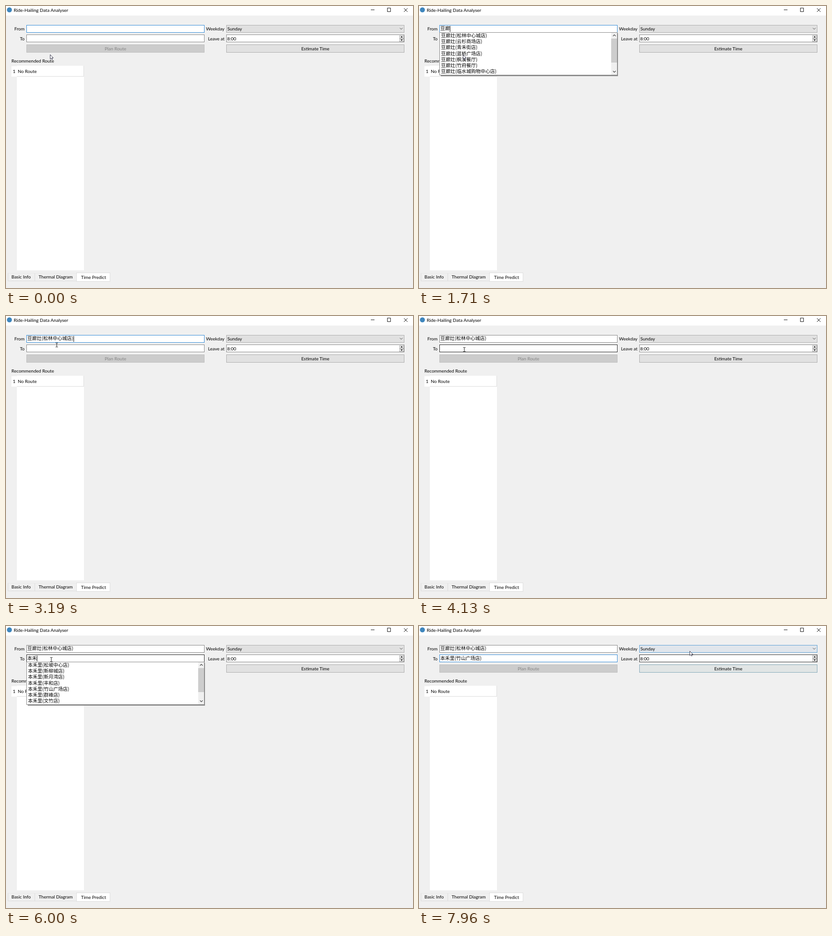
Recreate the animation shown at these times as an HTML page. Size 898 by 623 pixels, loop 8000 ms.

```html
<!DOCTYPE html>
<html lang="zh-CN">
<head>
<meta charset="utf-8">
<title>Ride-Hailing Data Analyser</title>
<style>
html, body { margin: 0; width: 100%; height: 100%; overflow: hidden; background: #f0f0f0; }
#stage { position: relative; width: 898px; height: 623px; overflow: hidden; background: #f0f0f0;
  font: 10px/16px Lato, "Noto Sans CJK SC", sans-serif; color: #000; cursor: default; }
#stage div, #stage svg { position: absolute; box-sizing: border-box; white-space: pre; }
#stage svg { overflow: visible; fill: none; }
.field { background: #fff; border: 1px solid #858585; }
.button { background: #e1e1e1; border: 1px solid #adadad; text-align: center; }
.zh { font-family: "Noto Sans CJK SC", "Noto Sans CJK", sans-serif; font-size: 10.5px; }
.preedit { border-bottom: 1px dotted #333; line-height: 13px; height: 12px; }
.caret { width: 1px; height: 13px; background: #000; }
.ime { height: 28px; background: #fff; border: 1px solid #0078d7; display: flex;
  font: 11px/27px "Noto Sans CJK SC", "Noto Sans CJK", sans-serif; }
#stage .ime div { position: relative; height: 26px; flex: none; padding-left: 10px; }
.ime small { display: inline-block; width: 7px; font-size: 7.5px; color: #777; }
#stage .ime .first { background: #0078d7; color: #fff; }
.ime .first small { color: #fff; }
#stage .ime .face { width: 28px; border-left: 1px solid #0078d7; }
.drop { background: #fff; border: 1px solid #858585; overflow: hidden; line-height: 13px; }
.drop .row { padding-left: 2.5px; }
.drop .on { background: #0078d7; color: #fff; }
</style>
</head>
<body>
<div id="stage"></div>
<script>
const LOOP = 8000;
const FOCUS = '#3089d6', IDLE = '#858585', HOVER = '#222';
const stage = document.getElementById('stage');

function box(x, y, w, h, style = '', cls = '', parent = stage) {
  const el = document.createElement('div');
  el.className = cls;
  el.style.cssText = `left:${x}px;top:${y}px;width:${w}px;height:${h}px;${style}`;
  parent.append(el);
  return el;
}
function label(x, y, text, style = '') {
  const el = document.createElement('div');
  el.style.cssText = `left:${x}px;top:${y - 8}px;${style}`;
  el.textContent = text;
  stage.append(el);
  return el;
}
function icon(x, y, shapes, parent = stage) {
  const holder = box(x, y, 0, 0, 'padding:0', '', parent);
  holder.innerHTML = `<svg width="1" height="1" style="left:0;top:0">${shapes}</svg>`;
  return holder;
}
const line = (d, color = '#333', width = 1) =>
  `<path d="${d}" stroke="${color}" stroke-width="${width}"/>`;
const show = (el, on) => { el.style.visibility = on ? 'visible' : 'hidden'; };

// Title bar
box(0, 0, 898, 21, 'background:#fff');
box(2, 3, 11, 11, 'background:#3f86bd;border-radius:50%');
label(17, 9, 'Ride-Hailing Data Analyser', 'font-size:10.25px');
icon(805, 9, line('M0 -.5h8M36.5 -4.5h7v8h-7zM73 -4l8 8M81 -4l-8 8', '#111'));

// Form
const rightLabel = (x, y, text) => label(0, y, text, `left:auto;right:${898 - x}px`);
rightLabel(41, 50, 'From');
rightLabel(41, 72, 'To');
rightLabel(482, 50, 'Weekday');
rightLabel(482, 72, 'Leave at');
const from = box(45, 42, 393, 17, '', 'field');
const to = box(45, 63, 393, 17, '', 'field');
const week = box(486, 42, 393, 17, '', 'button');
const spin = box(486, 63, 393, 17, '', 'field');
box(45, 85, 393, 18, 'background:#ccc;border-color:#bfbfbf;color:#838383', 'button').textContent = 'Plan Route';
const estimate = box(486, 85, 393, 18, '', 'button');
estimate.textContent = 'Estimate Time';
label(488.5, 50, 'Sunday');
label(488, 72, '8:00');
icon(872, 50, line('M-3 -1.5l3 3l3 -3', '#444'));
box(868, 65, 10, 7, 'background:#f0f0f0;border:1px solid #aaa');
box(868, 72, 10, 7, 'background:#f0f0f0;border:1px solid #aaa');
icon(873, 72, '<path d="M-2.5 -2.5h5l-2.5 -3zM-2.5 2h5l-2.5 3z" fill="#111"/>');

// Route list
label(12, 121, 'Recommended Route');
box(24, 132, 148, 452, 'background:#fff');
box(12, 133, 12, 23, 'background:#fff');
box(24, 132, 148, 24, 'border:solid #dcdcdc;border-width:0 1px 1px 0');
label(15, 144, '1');
label(26, 144, 'No Route');

// Tabs
box(4, 590, 60, 18, 'border:1px solid #dcdcdc;border-top-color:#e8e8e8');
box(63, 590, 93, 18, 'border:1px solid #dcdcdc;border-top-color:#e8e8e8');
box(155, 589, 75, 20, 'background:#fff;border:1px solid #dcdcdc');
label(12, 598, 'Basic Info');
label(72, 598, 'Thermal Diagram');
label(165.5, 599, 'Time Predict');

// Typing steps: time, text in the field, left edge of the candidate bar, candidates
const fromTyping = [
  [0, ''],
  [150, 'd', 50, '的 到 都 大 点 对 多'],
  [228, 'do', 55, '都 动 懂 东 洞 冬 栋'],
  [306, 'dou', 58, '都 豆 斗 抖 逗 兜 陡'],
  [384, "dou'l", 65, '豆粒 斗量 都来 豆 都 斗 抖'],
  [462, "dou'la", 71, '豆辣 都拉 都来 豆 都 斗 抖'],
  [540, "dou'lan", 77, '豆兰 豆篮 斗篮 都懒 都蓝 都烂 抖懒'],
  [700, "dou'lang", 77, '豆兰 豆篮 斗篮 都懒 都蓝 都烂 抖懒'],
  [780, "dou'lang", 82, '豆廊 都浪 斗浪 豆 都 斗 抖'],
  [1090, "dou'lang'z", 87, '豆廊灶 豆廊仔 豆廊在 豆廊 豆 斗 都'],
  [1168, "dou'lang'za", 92, '豆廊咂 豆廊灶 豆廊 豆 斗 都'],
  [1246, "dou'lang'zao", 98, '豆廊灶 豆廊早 豆廊 豆 斗 都'],
  [1324, '豆廊灶'],
  [1710, '豆廊'],
  [3116, '豆廊灶(松林中心城店)'],
];
const toTyping = [
  [0, ''],
  [4510, 'b', 47, '不 吧 把 被 比 本 别'],
  [4670, 'ben', 57, '本 笨 奔 苯 锛 贲 畚'],
  [4830, "ben'h", 64, '本会 本户 本号 本 奔 笨 苯'],
  [4910, "ben'he", 70, '本禾里 本合 本和 本盒 奔河 笨鹤 奔赫'],
  [5220, "ben'he'l", 76, '本禾里 本禾 本和 本 奔 笨 苯'],
  [5300, "ben'he'li", 78, '本禾里 本禾 本和 本 奔 笨 苯'],
  [5610, '本禾里'],
  [6000, '本禾'],
  [7488, '本禾里(竹山广场店)'],
];
// Pointer steps: time, x, y, 1 for the text beam
const pointer = [
  [0, 97, 107], [2410, 97, 101], [2488, 98, 88], [2566, 100, 77], [2650, 102, 71],
  [2800, 105, 69], [2960, 108, 66], [3116, 112, 64, 1], [3740, 104, 69, 1], [3890, 100, 74, 1],
  [6540, 103, 84], [6620, 109, 102], [6700, 116, 120], [6780, 119, 130],
  [7020, 116, 136], [7100, 111, 140], [7180, 109, 141],
  [7566, 125, 146], [7645, 200, 148], [7720, 330, 136], [7800, 460, 118], [7880, 585, 92], [7960, 597, 55],
];
// Caret steps: time, x, y (no x hides it)
const caretSteps = [
  [0], [1400, 79, 44], [1710, 68, 44], [2260], [2650, 68, 44], [3116, 149, 44], [3270],
  [3580, 47, 65], [4130], [5680, 79, 65], [6000, 68, 65], [6540], [7020, 68, 65], [7488],
];

function completer(top, brand, places) {
  const shade = box(48, top + 2, 391, 95, 'background:#8f8f8f');
  const drop = box(45, top, 393, 95, '', 'drop zh');
  const rows = places.split(' ').map((place, i) => {
    const row = box(0, i * 13.2 - 1, 378, 13.2, '', 'row', drop);
    row.textContent = `${brand}(${place})`;
    return row;
  });
  box(378, 0, 13, 93, 'background:#f0f0f0', '', drop);
  box(378, 13, 13, 53, 'background:#cdcdcd', '', drop);
  icon(384.5, 6, line('M-3 1.5l3 -3l3 3M-3 78.5l3 3l3 -3', '#444', 1.2), drop);
  return (on, picked) => {
    show(shade, on);
    show(drop, on);
    rows.forEach((row, i) => row.classList.toggle('on', i === picked));
  };
}

const fromText = label(47, 50, '');
const toText = label(47, 72, '');
const caret = box(0, 0, 1, 13, '', 'caret');
const fromList = completer(58, '豆廊灶',
  '松林中心城店 云杉商场店 青禾街店 蓝桥广场店 枫溪餐厅 竹府餐厅 临水城购物中心店 柳湖店');
const toList = completer(79, '本禾里',
  '松坡中心店 新柳城店 新月湾店 丰和店 竹山广场店 群峰店 文竹店 石桥店');
const ime = document.createElement('div');
ime.className = 'ime';
stage.append(ime);

const arrow = icon(0, 0, `<path d="M.5 .5V10.2L2.8 8.2 4.4 11.4 5.9 10.7 4.4 7.6H7.4Z"
  fill="#fff" stroke="#25253c" stroke-width=".9"/>`);
const beam = icon(0, 0, line('M-2.5 -4.5h2M.5 -4.5h2M0 -4.5v9M-2.5 4.5h2M.5 4.5h2', '#111'));

const at = (steps, t) => steps.findLast(step => step[0] <= t);

function setText(el, y, text) {
  const typing = /^[a-z']+$/.test(text);
  el.className = typing ? 'preedit' : 'zh';
  el.style.top = `${y - (typing ? 6 : 9)}px`;
  el.textContent = text;
}
function setIme([, , left, words], top) {
  ime.style.display = words ? 'flex' : 'none';
  if (!words) return;
  ime.style.left = `${left}px`;
  ime.style.top = `${top}px`;
  ime.innerHTML = words.split(' ').map((word, i) =>
    `<div${i ? '' : ' class="first"'} style="width:${26 + 11 * word.length}px"><small>${i + 1}</small>${word}</div>`
  ).join('') + '<div class="face"></div>';
  icon(13, 13.5, `<g stroke="#222"><circle r="5.2"/><path d="M-2.7 1.3Q0 4.2 2.7 1.3"/></g>
    <path d="M-2.7 -2.2h1.6v1.6h-1.6zM1.1 -2.2h1.6v1.6h-1.6z" fill="#222"/>`, ime.lastChild);
  ime.lastChild.firstChild.style.position = 'absolute';
}
function paint(el, border, fill) {
  el.style.borderColor = border;
  if (fill) el.style.backgroundColor = fill;
}

let lastFrom, lastTo;
function render(t) {
  const a = at(fromTyping, t), b = at(toTyping, t);
  if (a !== lastFrom || b !== lastTo) {
    setText(fromText, 50, a[1]);
    setText(toText, 72, b[1]);
    if (t < 4000) setIme(a, 59);
    else setIme(b, 81);
    lastFrom = a;
    lastTo = b;
  }
  fromList(t >= 1710 && t < 3116, t >= 3038 ? 0 : -1);
  toList(t >= 6000 && t < 7488, t >= 7410 ? 4 : -1);

  const [, cx, cy] = at(caretSteps, t);
  show(caret, cx);
  if (cx) caret.style.transform = `translate(${cx}px,${cy}px)`;

  const [, x, y, text] = at(pointer, t);
  show(arrow, !text);
  show(beam, text);
  (text ? beam : arrow).style.transform = `translate(${x}px,${y}px)`;

  paint(from, t < 3580 ? FOCUS : IDLE);
  paint(to, t < 3580 ? IDLE : t < 6540 ? HOVER : FOCUS);
  const end = t >= 7960, near = t >= 7880;
  paint(estimate, end ? '#82a8b8' : near ? '#0078d7' : '#adadad', end ? '#e1e5e5' : near ? '#e5f1fb' : '#e1e1e1');
  paint(spin, end ? '#333' : IDLE);
  paint(week, end ? '#5a9fd4' : '#adadad', end ? '#e1e6ec' : '#e1e1e1');
}

const start = performance.now();
function tick() {
  render((performance.now() - start) % LOOP);
  requestAnimationFrame(tick);
}
tick();
</script>
</body>
</html>
```
